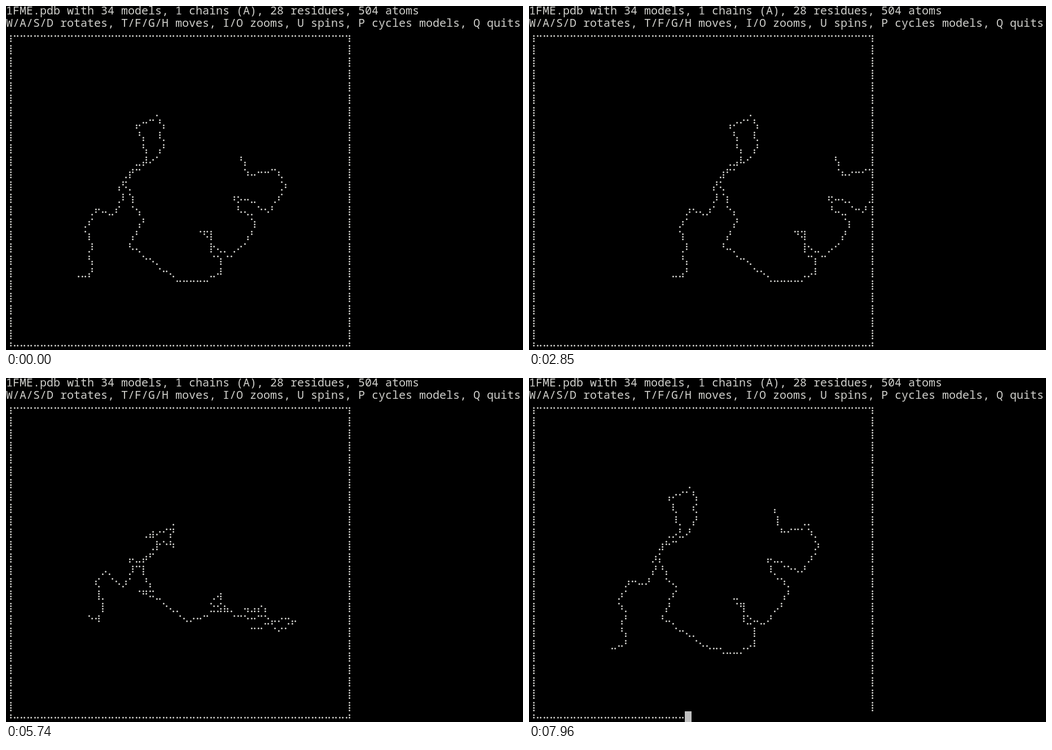
An HTML page with a canvas for the animation above (8000 ms loop, 916x611 px).

```html
<!DOCTYPE html>
<html lang="en">
<head>
<meta charset="utf-8">
<title>Protein viewer</title>
<style>
  html, body { margin: 0; width: 100%; height: 100%; overflow: hidden; background: #000; }
  canvas { position: absolute; left: 0; top: 0; }
  pre {
    position: absolute; left: 0; top: -3px; margin: 0; color: #d0d0cc;
    font: 500 20px/22px "Noto Sans Mono", "DejaVu Sans Mono", monospace;
  }
</style>
</head>
<body>
<canvas id="screen" width="916" height="611"></canvas>
<pre id="head">1FME.pdb with 34 models, 1 chains (A), 28 residues, 504 atoms
W/A/S/D rotates, T/F/G/H moves, I/O zooms, U spins, P cycles models, Q quits</pre>
<script>
const LOOP = 8000, CELL_W = 12, CELL_H = 22, TOP = -2;
const COLOR = '#d0d0cc';
const EDGE = 101;               // border, in braille dots
const AXIS = 54;                // height of the rotation axis
const MOVE = 3.6, TURN = 0.2;   // dots and radians per key press
const CLEAR = 50;               // ms a cleared screen stays

const ctx = document.getElementById('screen').getContext('2d');
const head = document.getElementById('head');

// Corners of the backbone: strand, hairpin turn, strand, bend, helix, tail
const corners = `21,79 24,79 25,76 24,71 25,69 23,63 26,57 31,59 34,53 33,50 37,44
  41,41 40,35 38,30 44,27 46,30 45,33 46,37 43,41 37,45 34,49 37,53 37,56 40,60 36,69
  43,74 50,80 58,80 63,78 63,73 60,71 60,64 57,64 62,70 66,72 70,68 73,63 72,59 68,57
  67,53 73,55 77,58 82,50 79,44 71,46 69,40`;

// Depth: a small coil all along, and the helix end leans towards the viewer
const chain = corners.trim().split(/\s+/).map((pair, i, all) => {
  const [x, y] = pair.split(',').map(Number);
  const u = i / (all.length - 1), lean = Math.max(0, (u - 0.55) / 0.45);
  return { x, y, z: 30 * lean ** 2 + 3 * Math.sin(2 * i) * (1 - lean) };
});

// Runs of key presses: n presses from time t, one every gap ms
const runs = [
  { t: 1480, n: 1, move: 1 },
  { t: 1980, n: 4, gap: 60, move: 1 },
  { t: 2340, n: 2, gap: 210, move: 1 },
  { t: 2850, n: 1, move: -1 },
  { t: 3160, n: 4, gap: 110, move: -1 },
  { t: 3920, n: 1, move: -1 },
  { t: 4790, n: 2, gap: 130, turn: 1 },
  { t: 5130, n: 1, turn: 1 },
  { t: 5680, n: 9, gap: 60, turn: 1 },
  { t: 6670, n: 1, turn: 1 },
  { t: 7200, n: 14, gap: 58, turn: -1 },
];
const clears = [2640, 3800, 4730, 5920, 7450];

function presses(t, kind) {
  return runs.reduce((sum, { t: start, n, gap = 1, [kind]: by = 0 }) =>
    t < start ? sum : sum + by * Math.min(n, 1 + Math.floor((t - start) / gap)), 0);
}

function plotLine(dots, [x0, y0], [x1, y1]) {
  const n = Math.max(Math.abs(x1 - x0), Math.abs(y1 - y0), 1);
  for (let i = 0; i <= n; i++) {
    const x = Math.round(x0 + (x1 - x0) * i / n), y = Math.round(y0 + (y1 - y0) * i / n);
    if (x > 0 && x <= EDGE && y > 0 && y <= EDGE) dots.add(y * 128 + x);
  }
}

function plotPath(dots, points) {
  for (let i = 1; i < points.length; i++) plotLine(dots, points[i - 1], points[i]);
}

function draw(t) {
  ctx.fillStyle = '#000';
  ctx.fillRect(0, 0, 916, 611);
  const blank = clears.some(c => t >= c && t < c + CLEAR);
  head.style.visibility = blank ? 'hidden' : 'visible';
  if (blank) return;

  const dots = new Set();
  plotPath(dots, [[1, 1], [EDGE, 1], [EDGE, EDGE], [1, EDGE], [1, 1]]);

  const dx = presses(t, 'move') * MOVE, a = presses(t, 'turn') * TURN;
  const cos = Math.cos(a), sin = Math.sin(a);
  plotPath(dots, chain.map(({ x, y, z }) =>
    [Math.floor(x + dx), Math.round(AXIS + (y - AXIS) * cos + z * sin)]));

  const partial = t >= 7960, row = 27, col = 23;  // last redraw stops mid-line
  ctx.fillStyle = COLOR;
  ctx.beginPath();
  for (const d of dots) {
    const x = d % 128, y = d >> 7, r = (y >> 2) + 2, c = x >> 1;
    if (partial && r === row && c >= col) continue;
    const px = c * CELL_W + (x & 1 ? 8.6 : 3.4);
    const py = TOP + r * CELL_H + 6.8 + (y & 3) * 4.55;
    ctx.moveTo(px + 1.5, py);
    ctx.arc(px, py, 1.5, 0, 7);
  }
  ctx.fill();
  if (partial) {
    ctx.fillStyle = '#c0c0c0';
    ctx.fillRect(col * CELL_W, TOP + row * CELL_H, CELL_W, CELL_H);
  }
}

function tick() {
  draw(performance.now() % LOOP);
  requestAnimationFrame(tick);
}
tick();
</script>
</body>
</html>
```
